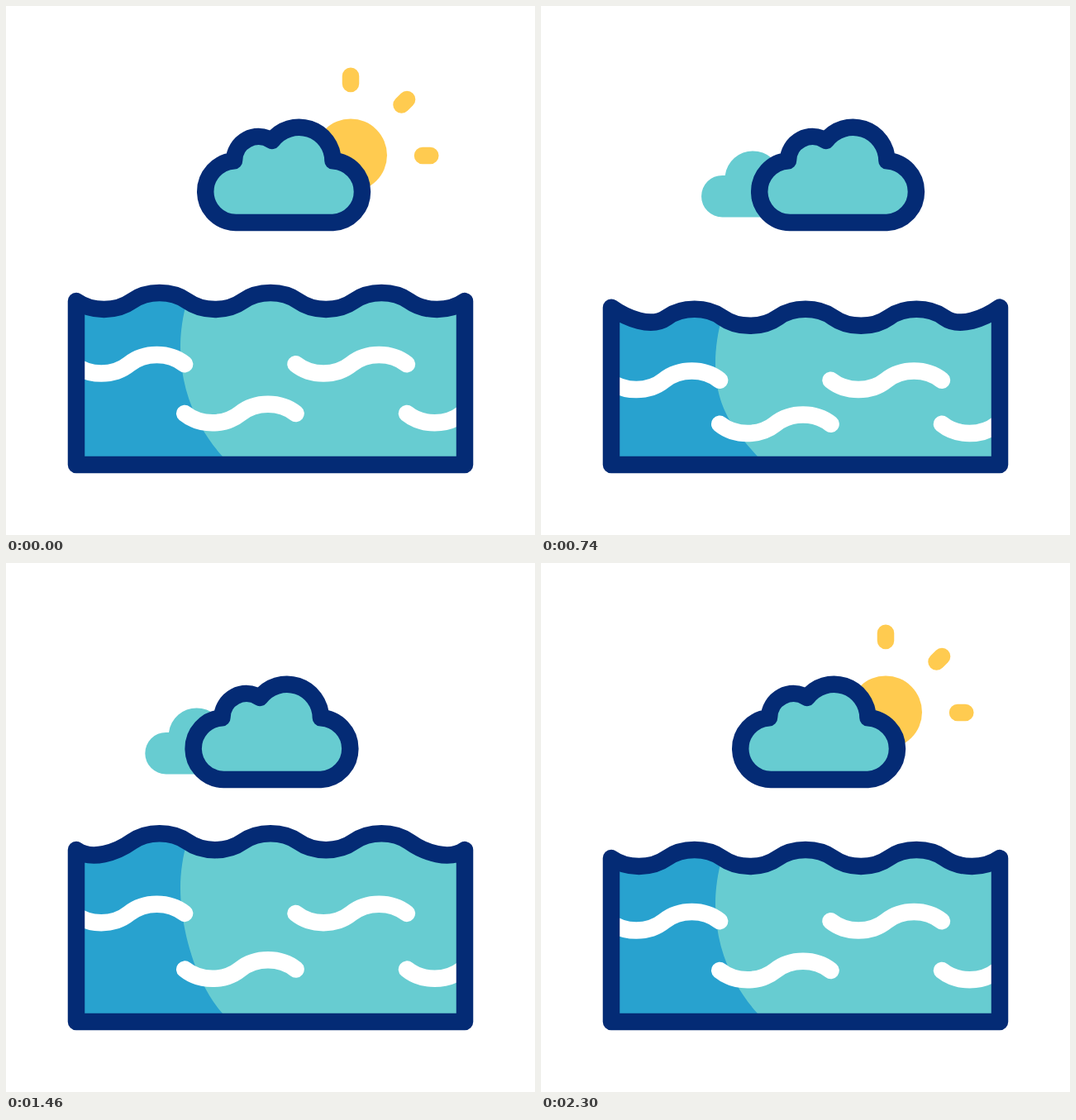
An HTML page that plays this animation: 640x640 px, repeating every 2400 ms.

```html
<!DOCTYPE html>
<html lang="en">
<head>
<meta charset="utf-8">
<title>Sea and clouds</title>
<style>
  html, body { margin: 0; width: 100%; height: 100%; overflow: hidden; background: #fff; }
  svg { display: block; width: 100%; height: 100%; }
  .line { stroke: #042b75; stroke-width: 20.5; }
  .teal { fill: #67ccd1; }
  .blue { fill: #28a2cf; }
  .foam { stroke: #fff; stroke-width: 20.5; fill: none; }
  .ray { stroke: #ffcb50; }
</style>
</head>
<body>
<svg viewBox="0 0 640 640" stroke-linecap="round" stroke-linejoin="round">
  <clipPath id="box"><rect x="85" y="300" width="470" height="255"/></clipPath>
  <clipPath id="sea"><path id="seaClip"/></clipPath>

  <g id="sun">
    <circle cx="417" cy="180.5" r="44" fill="#ffcb50"/>
    <path id="rays" class="ray"/>
  </g>

  <path id="back" class="teal" d="M25.5 255.5a25.3 25.3 0 0 1 0 -50.6h3.4a34 34 0 0 1 67.4 0a25.3 25.3 0 0 1 0 50.6z"/>
  <path id="front" class="teal line" d="M278 262A37.4 37.4 0 0 1 276 187.3A29.5 29.5 0 0 1 321.8 163A41 41 0 0 1 395.5 187.3A37.4 37.4 0 0 1 395.5 262Z"/>

  <g clip-path="url(#sea)">
    <rect class="teal" x="85" y="300" width="470" height="255"/>
    <path id="shade" class="blue"/>
  </g>
  <g clip-path="url(#box)">
    <path id="upper" class="foam"/>
    <path id="lower" class="foam"/>
  </g>
  <path id="rim" class="line" fill="none"/>
</svg>
<script>
const LOOP = 2400;
const $ = id => document.getElementById(id);
const shift = (id, x) => $(id).setAttribute('transform', `translate(${x} 0)`);
const shape = (id, d) => $(id).setAttribute('d', d);

// Smooth 0 to 1 between two times
function ease(t, from, to) {
  const p = Math.min(1, Math.max(0, (t - from) / (to - from)));
  return p * p * (3 - 2 * p);
}

// Rest, out to hi, across to lo, back to rest
const swing = (t, start, peak, dip, end, hi, lo) =>
  hi * ease(t, start, peak) + (lo - hi) * ease(t, peak, dip) - lo * ease(t, dip, end);

// Seven alternating arcs; the two ends move less than the rest
function surfacePath(swell, edge) {
  const w = 470 / 7;
  const y = i => 357 + (i % 7 ? swell : edge);
  let d = `M85 ${y(0)}`;
  for (let i = 0; i < 7; i++) {
    const x = 85 + i * w, h = i % 2 ? -13.3 : 13.3;
    d += `C${x + 18.6} ${y(i) + h} ${x + w - 18.6} ${y(i + 1) + h} ${x + w} ${y(i + 1)}`;
  }
  return d + 'V555H85Z';
}

const foam = (x, y) =>
  `M${x} ${y}c18.6 15 48.6 15 67.2 0c18.6 -15 48.6 -15 67.2 0`;

// Three spokes, 45 degrees apart, growing outwards
function rayPath(length) {
  let d = '';
  for (let i = 0; i < 3; i++) {
    const a = -i * Math.PI / 4, c = Math.cos(a), s = Math.sin(a);
    d += `M${417 + 87 * c} ${181 + 87 * s}l${length * c} ${length * s + 0.001}`;
  }
  return d;
}

function drawSky(t) {
  shift('front', swing(t, 100, 900, 1700, 2300, 25.6, -25.6));
  shift('back', 258 - 103 * (ease(t, 100, 1200) - ease(t, 1220, 2300)));

  const hidden = t > 540 && t < 1500;
  $('sun').style.display = hidden ? 'none' : '';
  shift('sun', t < 1000 ? -46 * ease(t, 80, 540) : -77 * (1 - ease(t, 1500, 2060)));
  shape('rays', rayPath(9.3 * (1 - ease(t, 60, 300) + ease(t, 1960, 2240))));
  $('rays').setAttribute('stroke-width', 20.5 * (1 - ease(t, 260, 380) + ease(t, 1820, 1940)));
}

function drawSea(t) {
  const surface = (hi, lo) => swing(t, 40, 780, 1490, 2070, hi, lo);
  const s = surface(20, -20);
  const rim = surfacePath(s, surface(7.7, -10));
  shape('rim', rim);
  shape('seaClip', rim);
  shape('shade', `M85 300H219.3V${357 + s}C214 ${373 + s} 211 ${394 + s} 211 ${413 + s}` +
    `C211 ${462 + s} 230 510 262 545V555H85Z`);

  const u = 433.3 + swing(t, 100, 810, 1520, 2070, 20, -10);
  const l = 493 + swing(t, 380, 1010, 1700, 2300, 21, -10);
  shape('upper', foam(81.7, u) + foam(350.5, u));
  shape('lower', foam(216.2, l) + foam(485, l));
}

const start = performance.now();
function tick() {
  const t = (performance.now() - start) % LOOP;
  drawSky(t);
  drawSea(t);
  requestAnimationFrame(tick);
}
tick();
</script>
</body>
</html>
```
